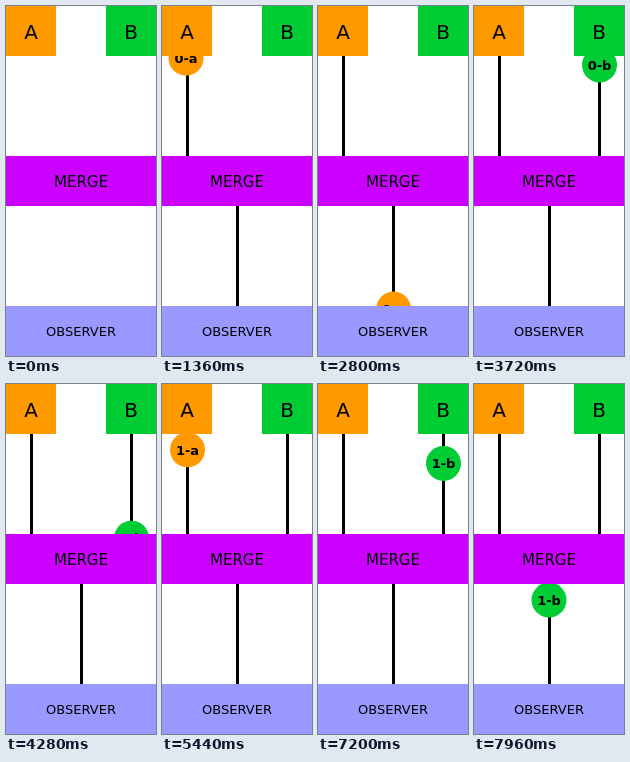
These frames come from a looping animation (150 px wide and 350 px high, 8 s). An HTML page:

```html
<!DOCTYPE html>
<html lang="en">
<head>
<meta charset="utf-8">
<title>Merge</title>
<style>
html, body { margin: 0; width: 100%; height: 100%; overflow: hidden; background: #fff; }
svg { display: block; width: 150px; height: 350px; }
text { font-family: Verdana, "DejaVu Sans", sans-serif; text-anchor: middle; }
.ball text { font-size: 13px; font-weight: bold; }
</style>
</head>
<body>
<svg id="stage" viewBox="0 0 150 350"></svg>
<script>
const LOOP = 8000, TICK = 40;
const LINE_TICKS = 15, LEG_TICKS = 21;
const ORANGE = "#ff9900", GREEN = "#00cc33";
const stage = document.getElementById("stage");

function add(parent, name, attrs, text) {
  const el = document.createElementNS("http://www.w3.org/2000/svg", name);
  for (const key in attrs) el.setAttribute(key, attrs[key]);
  if (text) el.textContent = text;
  return parent.appendChild(el);
}

// Each line grows upward by 100 px
const lines = [
  { x: 74, bottom: 300, start: 0 },
  { x: 24, bottom: 150, start: 15 },
  { x: 124, bottom: 150, start: 73 }
];

// x1: first leg, x2 to x3: second leg
const balls = [
  { label: "0-a", color: ORANGE, start: 30, x1: 24, x2: 77.5, x3: 75.3 },
  { label: "0-b", color: GREEN, start: 88, x1: 125.5, x2: 75, x3: 75 },
  { label: "1-a", color: ORANGE, start: 130, x1: 25.5, x2: 75, x3: 75 },
  { label: "1-b", color: GREEN, start: 172, x1: 125.5, x2: 75, x3: 75 }
];

function box(x, y, width, color, label, size, baseline) {
  add(stage, "rect", { x, y, width, height: 50, fill: color });
  add(stage, "text", { x: x + width / 2, y: baseline, "font-size": size }, label);
}

for (const line of lines) {
  line.el = add(stage, "rect", { x: line.x, width: 3 });
}
for (const ball of balls) {
  ball.el = add(stage, "g", { class: "ball" });
  add(ball.el, "circle", { r: 17.5, fill: ball.color });
  add(ball.el, "text", { y: 5 }, ball.label);
}
box(0, 0, 50, ORANGE, "A", 20, 33);
box(100, 0, 50, GREEN, "B", 20, 33);
box(0, 150, 150, "#cc00ff", "MERGE", 15, 181);
box(0, 300, 150, "#9999ff", "OBSERVER", 13, 330);

function ballAt(ball, n) {
  if (n <= LEG_TICKS) return [ball.x1, 25 + 6.8 * n];
  const k = n - LEG_TICKS - 1;
  return [ball.x2 + (ball.x3 - ball.x2) * k / LEG_TICKS, 182.5 + 6.7 * k];
}

function draw(ms) {
  const tick = Math.floor((ms % LOOP) / TICK + 0.001);
  for (const { el, bottom, start } of lines) {
    const part = Math.min(1, Math.max(0, (tick - start) / LINE_TICKS));
    el.setAttribute("y", bottom - 100 * part);
    el.setAttribute("height", 100 * part);
  }
  for (const ball of balls) {
    const n = tick - ball.start;
    const visible = n >= 0 && n <= 2 * LEG_TICKS;
    ball.el.setAttribute("visibility", visible ? "visible" : "hidden");
    if (visible) ball.el.setAttribute("transform", `translate(${ballAt(ball, n)})`);
  }
}

const begin = performance.now();
function loop() {
  draw(performance.now() - begin);
  requestAnimationFrame(loop);
}
draw(0);
requestAnimationFrame(loop);
</script>
</body>
</html>
```
